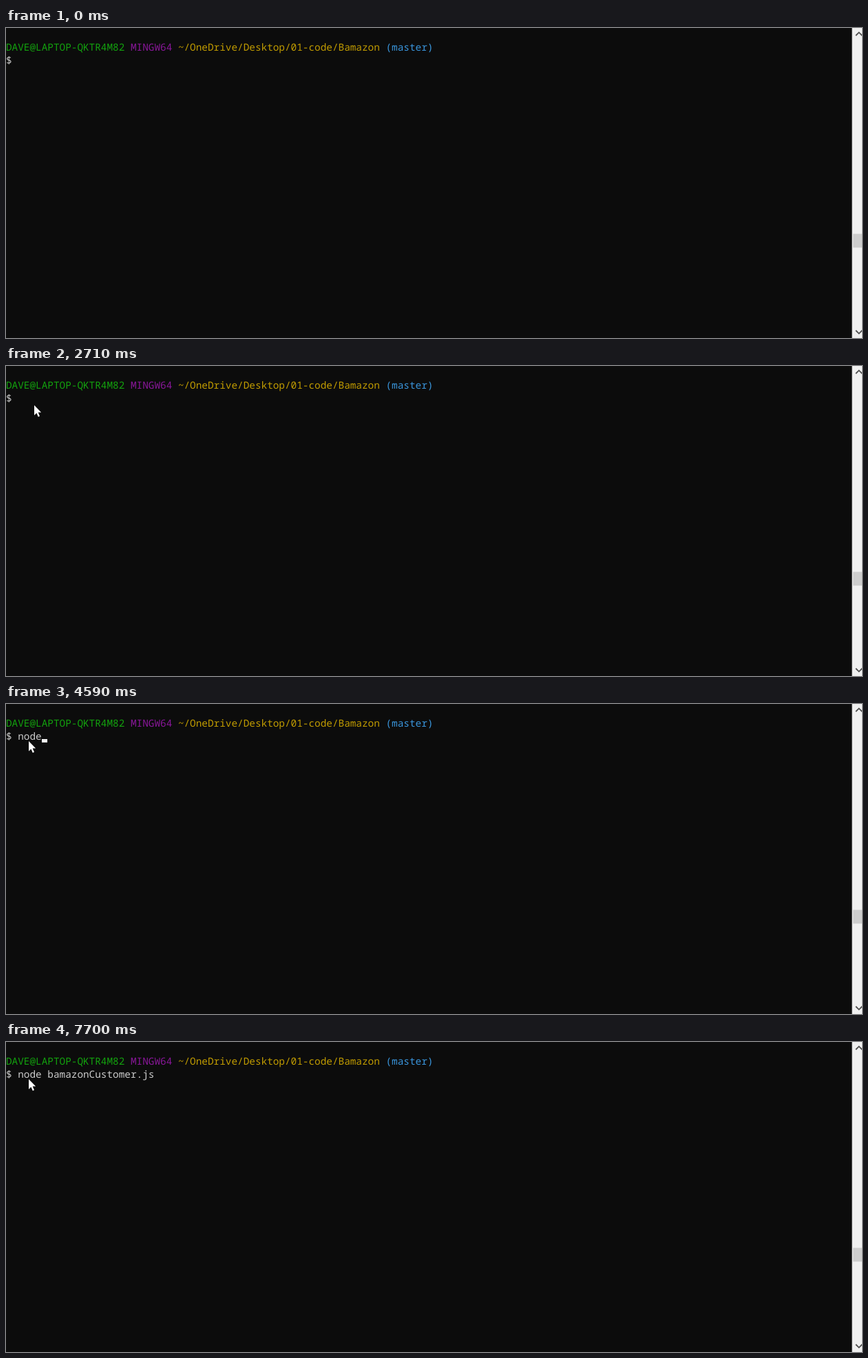
Write an HTML page that moves like this. It is 1243x451 px and loops after 8 s.

```html
<!DOCTYPE html>
<html lang="en">
<head>
<meta charset="utf-8">
<title>Terminal</title>
<style>
  html, body { margin: 0; width: 100%; height: 100%; overflow: hidden; background: #0c0c0c; }
  svg { display: block; width: 100vw; height: 100vh; }
  text {
    font: 14.375px "Noto Sans Mono", "DejaVu Sans Mono", monospace;
    white-space: pre;
    text-rendering: geometricPrecision;
  }
</style>
</head>
<body>
<svg viewBox="0 0 1243 451">
  <rect width="1243" height="451" fill="#0c0c0c"/>
  <text x="0" y="32.7"><tspan fill="#13a10e">DAVE@LAPTOP-QKTR4M82</tspan> <tspan fill="#881798">MINGW64</tspan> <tspan fill="#c19c00">~/OneDrive/Desktop/01-code/Bamazon</tspan> <tspan fill="#3a96dd">(master)</tspan></text>
  <text id="line" x="0" y="51.7" fill="#ccc"></text>
  <rect id="caret" height="5" fill="#f2f2f2"/>
  <g id="scrollbar">
    <rect x="1228.5" width="14.5" height="451" fill="#f0f0f0"/>
    <rect x="1230" y="299.5" width="13" height="20" fill="#cdcdcd"/>
    <path d="M1234 11l4.6-4.6 4.6 4.6M1234 440l4.6 4.6 4.6-4.6" fill="none" stroke="#505050" stroke-width="1.8"/>
  </g>
  <path id="pointer" d="M0 0V14.8L3.4 11.6 5.8 17 8 16 5.7 10.6H10.2Z" fill="#fff" stroke="#000" paint-order="stroke"/>
</svg>
<script>
const LOOP = 8000, CELL = 8.625, ROW = 19, CARET_Y = 51;
const FOCUS = 3410, BLINK = 530;
const $ = id => document.getElementById(id);

// Bursts of evenly spaced keys; a tab completes the last word.
const bursts = [
  { at: 4040, gap: 183, keys: 'node' },
  { at: 5290, gap: 465, keys: ' b\t' },
  { at: 6770, gap: 345, keys: 'c\t\n' },
];
const completions = { b: 'bamazon', bamazonc: 'bamazonCustomer.js ' };

const enter = { at: 130, step: 80, steps: 2, from: [954, 402], to: [857, 355] };
const sweep = { at: 2250, step: 76.5, steps: 10, from: [797, 334], to: [33, 54] };

function typedAt(t) {
  let text = '', last = FOCUS, entered = false;
  for (const { at, gap, keys } of bursts) {
    [...keys].forEach((key, i) => {
      const time = at + i * gap;
      if (time > t) return;
      last = time;
      if (key === '\n') entered = true;
      else if (key === '\t') text = text.replace(/\S+$/, word => completions[word]);
      else text += key;
    });
  }
  return { text, last, entered };
}

// A key shows the caret; each tick of the running blink timer toggles it.
function caretOn(t, last) {
  const ticks = time => Math.floor((time - FOCUS) / BLINK);
  return t >= FOCUS && (ticks(t) - ticks(last)) % 2 === 0;
}

// Stepped glide that slightly overshoots and settles.
function glide({ at, step, steps, from, to }, t) {
  const u = Math.min(Math.floor((t - at) / step) / steps, 1);
  const rest = (1 - u) * Math.exp(-1.9 * u) * Math.cos(2.48 * u);
  return to.map((end, i) => Math.round(end + (from[i] - end) * rest));
}

function show(el, on) {
  el.style.display = on ? '' : 'none';
}

function draw(t) {
  const { text, last, entered } = typedAt(t);
  $('line').textContent = '$ ' + text;

  const col = entered ? 0 : 2 + text.length;
  const left = Math.round(col * CELL);
  const caret = $('caret');
  caret.setAttribute('x', left);
  caret.setAttribute('y', CARET_Y + (entered ? ROW : 0));
  caret.setAttribute('width', Math.round((col + 1) * CELL) - left);
  show(caret, caretOn(t, last));

  const pointer = $('pointer');
  pointer.setAttribute('transform', `translate(${glide(t < sweep.at ? enter : sweep, t)})`);
  show(pointer, t >= enter.at);
}

const start = performance.now();
function tick() {
  draw((performance.now() - start) % LOOP);
  requestAnimationFrame(tick);
}
tick();
</script>
</body>
</html>
```
